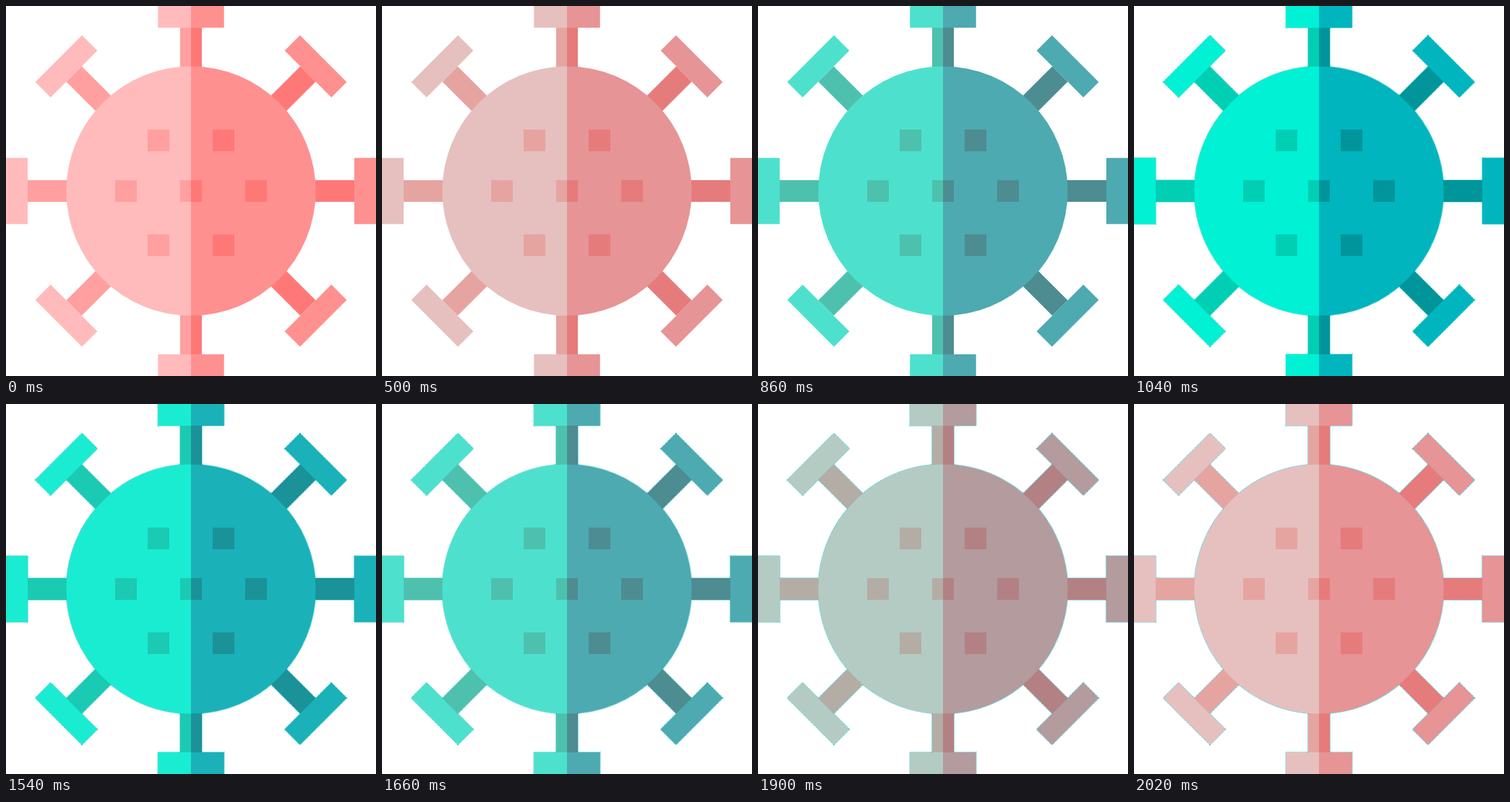
An HTML page with a canvas for the animation above (2.08 s loop, 512x512 px).

```html
<!DOCTYPE html>
<html lang="en">
<head>
<meta charset="utf-8">
<title>Virus colour fade</title>
<style>
  html, body { margin: 0; width: 100%; height: 100%; overflow: hidden; background: #fff; }
  canvas { display: block; width: 512px; height: 512px; }
</style>
</head>
<body>
<canvas id="stage" width="512" height="512"></canvas>
<script>
const ctx = document.getElementById('stage').getContext('2d');
const LOOP = 2080, HALF = 1040, HOLD = 500, STEP = 60;
const MID = 256, RADIUS = 172.6;

// Each half: body and accent colours, pink to teal
const halves = [
  { x: 0, body: [[255, 187, 187], [0, 241, 212]], accent: [[255, 159, 159], [0, 207, 180]] },
  { x: MID, body: [[255, 144, 144], [0, 181, 190]], accent: [[255, 120, 120], [0, 149, 155]] }
];
const spots = [[-45, -70], [45, -70], [-90, 0], [0, 0], [90, 0], [-45, 75], [45, 75]];

const stems = new Path2D(), caps = new Path2D(), disc = new Path2D(), dots = new Path2D();

function addRect(path, x, y, w, h, angle = 0) {
  const rect = new Path2D();
  rect.rect(x, y, w, h);
  path.addPath(rect, new DOMMatrix().translate(MID, MID).rotate(angle));
}

for (let i = 0; i < 8; i++) {
  const top = i % 2 ? -259 : -256;
  addRect(stems, -15, top + 30, 30, 80, i * 45);
  addRect(caps, -45.7, top, 91.4, 30, i * 45);
}
disc.arc(MID, MID, RADIUS, 0, Math.PI * 2);
spots.forEach(([x, y]) => addRect(dots, x - 15, y - 15, 30, 30));

function mix([a, b], k) {
  return `rgb(${a.map((v, i) => Math.round(v + (b[i] - v) * k))})`;
}

// Thin dotted rim that stays visible on the way back to pink
function drawRim() {
  ctx.strokeStyle = '#00b5be';
  ctx.lineWidth = 1.6;
  ctx.setLineDash([1, 1]);
  [stems, caps, disc].forEach(p => ctx.stroke(p));
}

function drawHalf(half, k) {
  const body = mix(half.body, k), accent = mix(half.accent, k);
  ctx.save();
  ctx.beginPath();
  ctx.rect(half.x, 0, MID, 512);
  ctx.clip();
  [[stems, accent], [caps, body], [disc, body], [dots, accent]].forEach(([path, colour]) => {
    ctx.fillStyle = colour;
    ctx.fill(path);
  });
  ctx.restore();
}

function draw(now) {
  const t = now % LOOP, back = t >= HALF, local = t % HALF;
  const fade = local < HOLD ? 0 : (Math.floor((local - HOLD) / STEP) + 1) / 10;
  const k = back ? 1 - fade : fade;
  ctx.fillStyle = '#fff';
  ctx.fillRect(0, 0, 512, 512);
  if (back) drawRim();
  halves.forEach(half => drawHalf(half, k));
}

let start;
function tick(now) {
  start ??= now;
  draw(now - start);
  requestAnimationFrame(tick);
}
draw(0);
requestAnimationFrame(tick);
</script>
</body>
</html>
```
